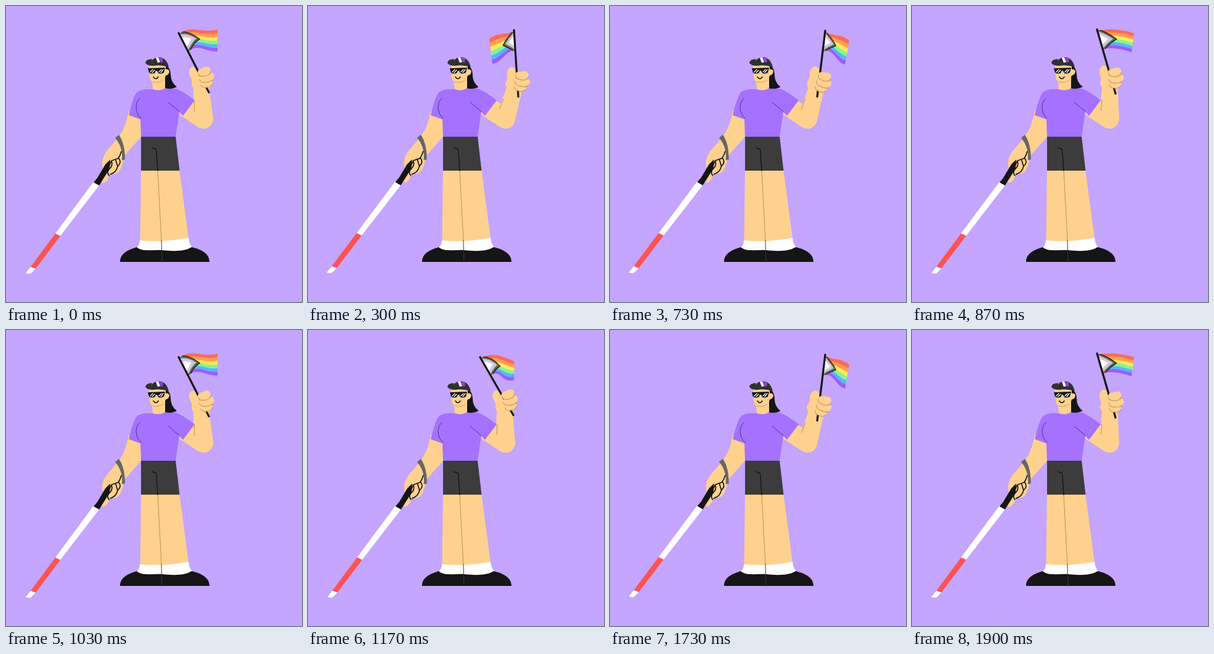
Recreate the animation shown at these times as an HTML page with a canvas. Size 480 by 480 pixels, loop 2030 ms.

```html
<!DOCTYPE html>
<html lang="en">
<head>
<meta charset="utf-8">
<title>Waving a flag</title>
<style>
html, body { margin: 0; height: 100%; overflow: hidden; background: #c4a5ff; }
canvas { display: block; width: 480px; height: 480px; }
</style>
</head>
<body>
<canvas id="stage" width="480" height="480"></canvas>
<script>
const ctx = document.getElementById('stage').getContext('2d');
const SKIN = '#ffd18f', CREASE = '#bd9256', SHIRT = '#a472ff', INK = '#151515';
const RAINBOW = ['#ff6a5c', '#ffa04f', '#ffe95f', '#86f48d', '#58b4ff', '#9c5cff'];
// Chevron layers, outermost first: apex position along the flag and colour
const CHEVRONS = [[.53, '#222'], [.48, '#8c6039'], [.4, '#8fe0f5'], [.32, '#ffb3d1'], [.25, '#fff']];

const LOOP = 2030, ELBOW = [320, 183];
const STARTS = [0, 170, 300, 470, 600, 730, 870, 1030, 1170, 1300, 1430, 1600, 1730, 1900];

// pole: top and bottom; top/low: remaining Bezier points of the flag's long edges
const POSES = [
  { pole: [280, 44, 329, 140], top: [300, 28, 318, 46, 343, 38], low: [312, 60, 322, 74, 343, 74] },
  { pole: [279, 44, 333, 138], top: [298, 34, 318, 44, 335, 51], low: [314, 62, 314, 88, 334, 81] },
  { pole: [334, 39, 341, 147], top: [321, 47, 310, 42, 294, 53], low: [322, 70, 314, 92, 299, 94] },
  { pole: [368, 43, 355, 151], top: [350, 38, 332, 36, 311, 45], low: [348, 73, 336, 69, 319, 76] },
  { pole: [371, 43, 354, 151], top: [355, 34, 336, 46, 321, 50], low: [350, 62, 340, 88, 322, 80] },
  { pole: [349, 40, 336, 147], top: [362, 49, 372, 44, 388, 56], low: [364, 68, 366, 92, 381, 95] },
  { pole: [300, 38, 330, 142], top: [320, 36, 340, 38, 360, 44], low: [325, 66, 340, 70, 356, 75] }
];

const mix = (a, b, t) => a + (b - a) * t;
const fill = (d, color) => { ctx.fillStyle = color; ctx.fill(new Path2D(d)); };

function line(d, color, width = 1) {
  ctx.strokeStyle = color;
  ctx.lineWidth = width;
  ctx.lineCap = ctx.lineJoin = 'round';
  ctx.stroke(new Path2D(d));
}

function at(x, y, angle, draw) {
  ctx.save();
  ctx.translate(x, y);
  ctx.rotate(angle);
  draw();
  ctx.restore();
}

function bezier(p, t) {
  const s = 1 - t, k = [s * s * s, 3 * s * s * t, 3 * s * t * t, t * t * t];
  return [0, 1].map(axis => k.reduce((sum, w, i) => sum + w * p[2 * i + axis], 0));
}

function drawFlag({ pole, top, low }) {
  const onPole = t => [mix(pole[0], pole[2], t), mix(pole[1], pole[3], t)];
  const upper = [...onPole(.02), ...top], lower = [...onPole(.31), ...low];
  const patch = (color, corners) => {
    ctx.fillStyle = color;
    ctx.beginPath();
    corners.forEach(([u, v], i) => {
      const [u2, v2] = corners[(i + 1) % corners.length];
      for (let t = 0; t < 1; t += 1 / 12) {
        const a = bezier(upper, mix(u, u2, t)), b = bezier(lower, mix(u, u2, t));
        const w = mix(v, v2, t);
        ctx.lineTo(mix(a[0], b[0], w), mix(a[1], b[1], w));
      }
    });
    ctx.fill();
  };
  RAINBOW.forEach((color, i) => {
    const v = i / 6, end = Math.min(1, v + .18);
    patch(color, [[0, v], [1, v], [1, end], [0, end]]);
  });
  CHEVRONS.forEach(([apex, color]) => {
    const base = Math.max(0, apex - .42), v = Math.max(0, .5 - apex / .84);
    patch(color, [[0, v], [base, v], [apex, .5], [base, 1 - v], [0, 1 - v]]);
  });
}

function drawFlagArm(pose) {
  const [x1, y1, x2, y2] = pose.pole;
  const x = mix(x1, x2, .77), y = mix(y1, y2, .77);
  const dx = x - 1 - ELBOW[0], dy = y + 4 - ELBOW[1];
  const reach = Math.hypot(dx, dy);
  line(`M284,159L${ELBOW}`, SKIN, 32);
  at(...ELBOW, Math.atan2(dx, -dy), () => {
    fill(`M-16,0L-13,${-reach}H11L16,0Z`, SKIN);
    if (x < 350) line('M-13,-30L-14,-13', CREASE);
  });
  drawFlag(pose);
  const turn = .85 * (.47 - Math.atan2(x2 - x1, y2 - y1));
  at(x, y, turn, () =>
    fill('M-21,-11Q-20,-20 -13,-19Q-6,-18 -6,-10H6L14,14L-8,20Q-14,16 -17,10Q-15,2 -20,-5Z', SKIN));
  line(`M${x1},${y1}L${x2},${y2}`, INK, 3.2);
  at(x, y, turn, () => {
    line('M-1,-10L8,-14M1,0L14,-4', SKIN, 12);
    line('M3,9L12,7', SKIN, 11);
    line('M-6,-9Q-5,-3 4,-4Q12,-5 15,-11M-4,1Q-2,7 6,6Q15,5 18,2M-2,10Q2,16 10,14Q15,13 17,8', CREASE);
  });
}

function drawCaneArm(angle) {
  at(208, 190, angle, () => {
    ctx.translate(-208, -190);
    fill('M199,170L219,178V212L192,243Q189,261 183,269Q176,274 168,273Q166,284 158,287L153,284L157,262Q153,249 164,234Q179,218 186,207Q194,196 199,170Z', SKIN);
    fill('M183,209Q193,223 193,249L188,250Q190,229 177,214Z', '#666');
    fill('M142,285L151,291L88,373L80,369Z', '#fff');
    fill('M80,369L88,373L48,426L40,423Z', '#ff5252');
    fill('M40,423L48,426L40,434Q35,435 32,433Z', '#fff');
    fill('M148,279L161,257L169,249L168,264L151,291L142,286Z', INK);
    line('M187,236Q185,243 182,247L171,251L166,262M183,247Q188,254 181,260Q179,270 169,273M171,251Q174,259 167,265Q163,270 167,275M178,250L181,260', INK, 1.7);
  });
}

function drawLegs() {
  fill('M219,264H281L297,384H217.5Z', SKIN);
  line('M246,266L252,380', CREASE);
  fill('M217,380Q253,384 296,376Q297,386 302,391V400H211V392Q217,388 217,380Z', '#fff');
  fill('M185,415C185,402 196,396 212,391C220,399 238,395 254,396C272,398 290,398 301,391C318,395 330,402 330,415Z', INK);
  line('M252,380L253,415', '#3a3a3a');
  fill('M219,211H275L281.5,267H219Z', '#3c3c3c');
  line('M237,230L243,232Q244,234 244,238L246,267', INK, 1.4);
}

function drawShirt() {
  fill('M235,135L263,134H276Q288,139 306,153L287,178L281,172L275,212H219L218,184L199,177Q203,160 208,147Q212,136 226,135Z', SHIRT);
  line('M217,150Q211,155 211,165Q212,177 219,182M263,156L281,171', '#50318c');
}

function drawHead(sway) {
  at(261, 100, sway, () => fill('M-12,-6Q5,-6 6,10Q6,24 16,31Q8,36 -5,33Z', INK));
  fill('M236,110H258V133Q249,139 238,135Z', SKIN);
  fill('M232,94H259V112Q257,125 243,125Q234,124 233,115Z', SKIN);
  fill('M256,104Q263,100 265,106Q264,113 257,113Z', SKIN);
  line('M238,123Q248,126 255,120', CREASE, .8);
  line('M239,115Q243,121 247,115', INK, 1.6);
  fill('M236,89Q240,83 249,83Q260,84 264,99Q250,95 239,97Q228,97 226,92Q227,86 237,86Z', '#303030');
  fill('M243,84L247,83L250,91L246,92Z', '#fff');
  fill('M247,83Q253,83 255,86L254,92L250,91Z', '#8747c5');
  fill('M230,101L258,100L256,108Q252,111 247,109L245,105H243L241,109Q235,111 232,108Z', INK);
  line('M234,107L238,103M237,108L241,104M248,107L252,103M251,108L255,103', '#fff', 1.3);
}

function frame(now) {
  const time = now % LOOP;
  const step = STARTS.findLastIndex(start => start <= time) % 7;
  const sway = 1 - Math.cos(step * 2 * Math.PI / 7);
  ctx.fillStyle = '#c4a5ff';
  ctx.fillRect(0, 0, 480, 480);
  drawCaneArm(sway * .005);
  drawFlagArm(POSES[step]);
  drawLegs();
  drawShirt();
  drawHead(sway * .015);
  requestAnimationFrame(frame);
}
requestAnimationFrame(frame);
</script>
</body>
</html>
```
